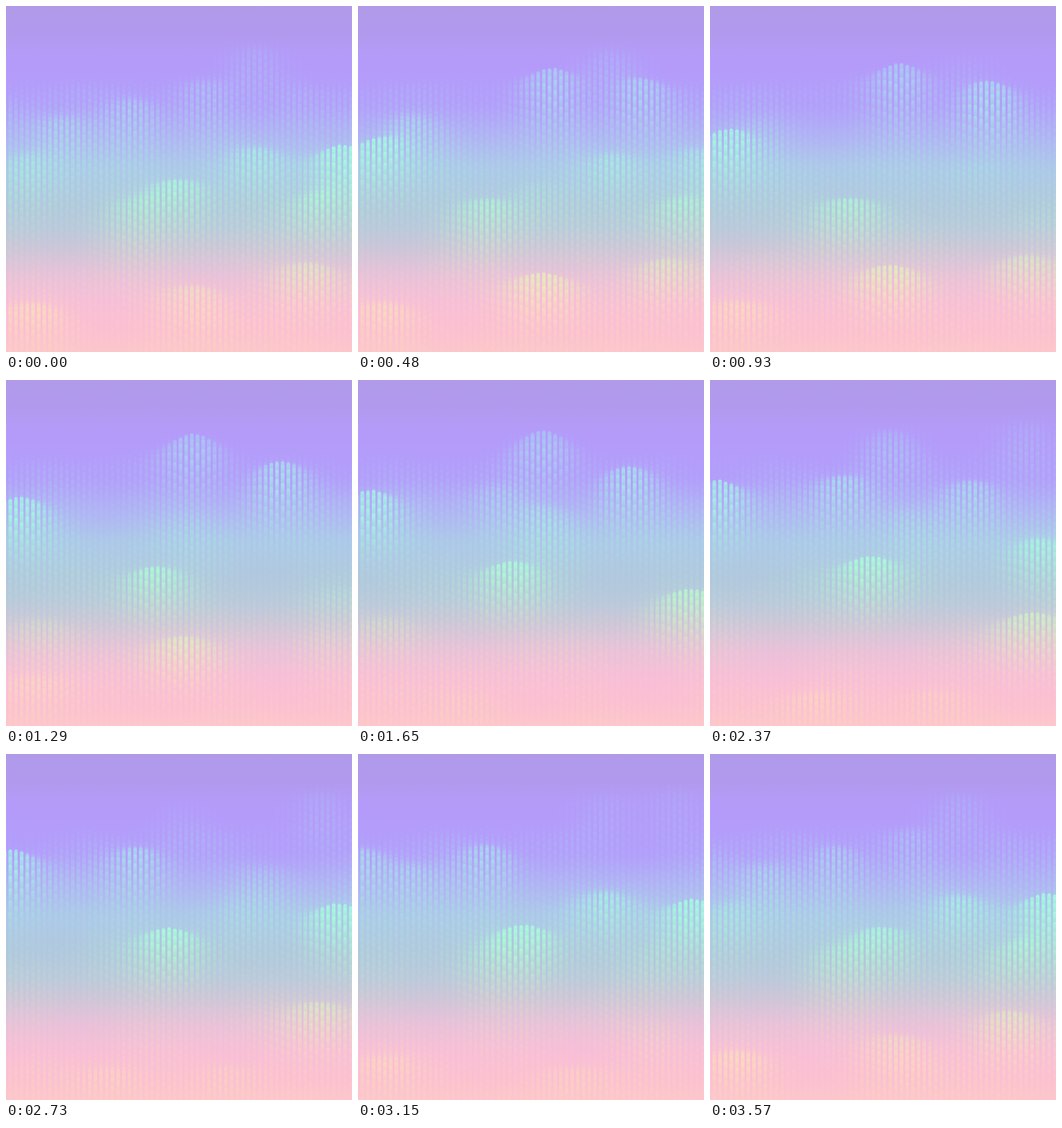
An HTML page with a canvas that plays this animation: 500x500 px, repeating every 3600 ms.

```html
<!DOCTYPE html>
<html lang="en">
<head>
<meta charset="utf-8">
<title>Pastel dunes</title>
<style>
html, body { margin: 0; width: 100%; height: 100%; overflow: hidden; background: #b49bfb; }
canvas { display: block; width: 500px; height: 500px; }
</style>
</head>
<body>
<canvas id="stage" width="500" height="500"></canvas>
<script>
const SIZE = 500, LOOP = 3600, STEP = 30;
const COL = 8.2, ROW = 10.6, LIFT = 40;
const ctx = document.getElementById('stage').getContext('2d');

// Colour stops down the stage: flat ground and lit pillar tops.
const GROUND = '0 b09ae8,40 b19aee,75 b49bfa,145 b39dfb,190 b1b1f5,235 adc7e9,285 b1c7de,320 b9c8dc,350 cbc5d9,390 e8c0da,430 f8bdd8,470 fbbfd2,500 fcc6cc';
const LIT = '0 adb0f4,60 a8b8f5,110 a8d4f0,150 a4e8e8,205 a2fade,260 a8fbd8,305 b6f6cc,350 d3edc4,405 f0e8b8,450 fde1b6,500 ffd3bc';

// Hills: start x, top; end x, top; birth, lifespan (in loops); strength.
const HILLS = [
  [36, 228, -3, 118, .8, 1.3, 1],
  [85, 180, 70, 172, .7, .65, .5],
  [205, 165, 178, 137, .3, .9, .7],
  [292, 116, 252, 60, .85, 1, .9],
  [350, 62, 372, 85, .75, .6, .45],
  [420, 100, 365, 165, .9, .98, .85],
  [455, 85, 458, 55, .45, .55, .4],
  [470, 245, 492, 195, .5, .75, 1],
  [195, 292, 268, 244, 0, 1.3, .95],
  [200, 300, 170, 300, .75, .6, .5],
  [350, 212, 385, 235, .7, .65, .6],
  [260, 205, 285, 198, .3, .45, .45],
  [425, 282, 490, 305, .8, .5, .65],
  [425, 392, 465, 365, .8, .65, .75],
  [492, 290, 445, 390, .3, .6, .9],
  [280, 412, 245, 368, .88, .62, 1],
  [35, 455, 50, 438, .7, .85, .6],
  [155, 470, 148, 472, .35, .6, .5],
  [325, 462, 310, 470, .4, .7, .45],
  [60, 362, 20, 358, .2, .5, .5]
];

const clamp = v => Math.max(0, Math.min(1, v));
const mix = (a, b, u) => a + (b - a) * u;
const smooth = u => { u = clamp(u); return u * u * (3 - 2 * u); };

function ramp(spec) {
  const stops = spec.split(',').map(s => {
    const [y, hex] = s.split(' ');
    return { y: +y, rgb: [0, 2, 4].map(i => parseInt(hex.substr(i, 2), 16)) };
  });
  return Array.from({ length: SIZE + 1 }, (_, y) => {
    const i = Math.max(1, stops.findIndex(s => s.y >= y));
    const a = stops[i - 1], b = stops[i], u = (y - a.y) / (b.y - a.y);
    return a.rgb.map((v, c) => mix(v, b.rgb[c], u));
  });
}
const ground = ramp(GROUND), lit = ramp(LIT);

function tone(y, k) {
  const i = Math.round(Math.max(0, Math.min(SIZE, y)));
  return `rgb(${ground[i].map((v, c) => Math.round(mix(v, lit[i][c], k)))})`;
}

const backdrop = ctx.createLinearGradient(0, 0, 0, SIZE);
for (let y = 0; y <= SIZE; y += 10) backdrop.addColorStop(y / SIZE, tone(y, 0));

// Hills alive at time t; a lifespan may reach into the next loop.
function hillsAt(t) {
  const out = [];
  for (const [x0, y0, x1, y1, birth, span, power] of HILLS) {
    for (let n = 0; n < 3; n++) {
      const u = (t + n - birth) / span;
      if (u <= 0 || u >= 1) continue;
      const amp = power * smooth(u / .32) * smooth((1 - u) / .32);
      const top = mix(y0, y1, u);
      out.push({ x: mix(x0, x1, u), y: top + power * LIFT, rx: 27 + top * .035, amp });
    }
  }
  return out;
}

function heightAt(x, y, t, hills) {
  const a = t * 2 * Math.PI;
  const swell = .15 + .1 * Math.sin(x / 43 + y / 61 + Math.sin(a)) * Math.cos(y / 37 - x / 90 + Math.cos(a));
  let h = swell * smooth((y - 92) / 50);
  for (const b of hills) {
    const dy = (y - b.y) / (y < b.y ? 18 : 34);
    if (Math.abs(dy) > 2.8) continue;
    const dx = (x - b.x) / b.rx;
    if (Math.abs(dx) < 2.8) h += b.amp * Math.exp(-(dx * dx + dy * dy) / 2);
  }
  return h > 1 ? 1 + (h - 1) * .4 : h;
}

// Staggered lattice, sorted from back to front.
const spots = [];
for (let i = 0; i < 63; i++) {
  const shift = (i * 4.3) % ROW;
  for (let y = 50 + shift; y < 560; y += ROW) spots.push({ x: i * COL - 2, y });
}
spots.sort((a, b) => a.y - b.y);

function pillar(x, y, k) {
  const len = 14 + 14 * k;
  const g = ctx.createLinearGradient(0, y - 2, 0, y + len);
  g.addColorStop(0, tone(y, k));
  g.addColorStop(.45, tone(y + len * .45, k * .55));
  g.addColorStop(1, tone(y + len, 0));
  ctx.strokeStyle = g;
  ctx.beginPath();
  ctx.moveTo(x, y);
  ctx.lineTo(x, y + len);
  ctx.stroke();
}

function draw(t) {
  ctx.fillStyle = backdrop;
  ctx.fillRect(0, 0, SIZE, SIZE);
  ctx.lineWidth = 5;
  ctx.lineCap = 'round';
  const hills = hillsAt(t);
  for (const { x, y } of spots) {
    const h = heightAt(x, y, t, hills);
    if (h > .025) pillar(x, y - h * LIFT, clamp(h * 1.05));
  }
}

let last = -1;
function tick() {
  const step = Math.floor((performance.now() % LOOP) / STEP);
  if (step !== last) draw(step * STEP / LOOP);
  last = step;
  requestAnimationFrame(tick);
}
tick();
</script>
</body>
</html>
```
